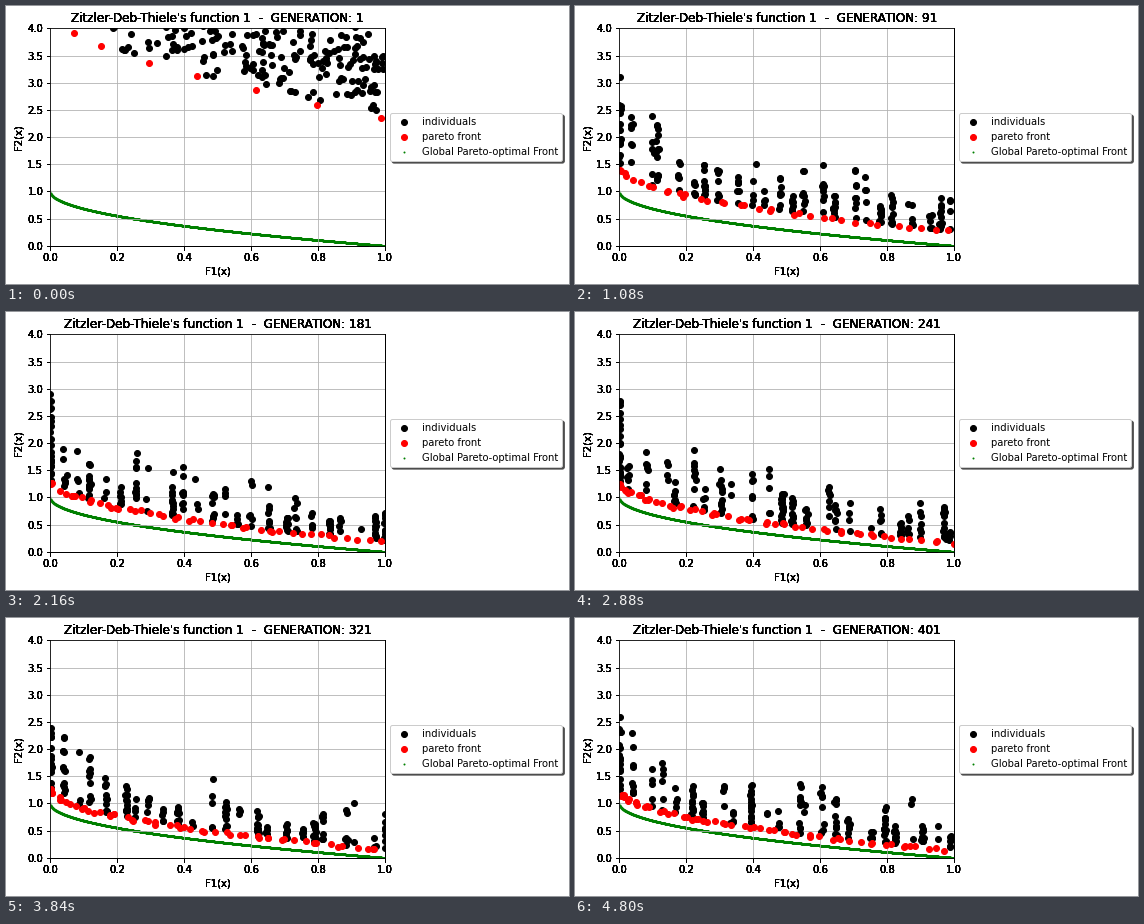
A matplotlib script that plays this animation: 563 by 278 pixels, repeating every 4.92 s.

```python
import matplotlib.pyplot as plt
import numpy as np
from matplotlib.animation import FuncAnimation

W, H, DPI = 563, 278, 72
FRAMES, INTERVAL, STEP = 41, 120, 10
NICHES, LIFE = 24, 9
TITLE = "Zitzler-Deb-Thiele's function 1  -  GENERATION: {}"
BOX = [44.3 / W, 38.19 / H, 334.8 / W, 217.44 / H]

plt.rcParams.update({"font.family": "DejaVu Sans", "font.size": 10})


def zdt1(x, g):
    return g * (1 - np.sqrt(x / g))


def best_g(gen):
    """Distance factor of the front: a fast drop, then a slow approach."""
    return 1.22 + .5 * np.exp(-gen / 110) + 2.75 * np.exp(-(gen - 1) / 15)


def niche(k, frame):
    """Place, height and weight of a niche; each is renewed every LIFE frames."""
    epoch = (frame + 5 * k) // LIFE
    rng = np.random.default_rng([k, epoch])
    x = min((k + rng.uniform(-.4, .4)) / (NICHES - 1), 1) if k else 0
    return x, rng.uniform(.4, 1.45) if k else 1.5, rng.uniform(.4, 1.6) if k else 2.5


def population(frame):
    """Return the individuals and the pareto front of one generation."""
    gen = 1 + frame * STEP
    rng = np.random.default_rng(500 + frame)
    g = best_g(gen)
    settled = 1 - np.exp(-(gen - 1) / 20)

    n = int(300 - 105 * settled)
    place, reach, weight = np.array([niche(k, frame) for k in range(NICHES)]).T
    pick = rng.choice(NICHES, n, p=weight / weight.sum())
    in_niche = rng.uniform(size=n) < settled
    x = np.where(in_niche, place[pick] + rng.normal(0, .002, n), rng.uniform(0, 1, n))
    x = np.clip(np.abs(x), 0, 1)

    spread = reach[pick] * (1 + .4 * np.exp(-gen / 80))
    late = .06 + spread * rng.uniform(0, 1, n) ** 1.3
    early = np.maximum(rng.normal(1.02, .47, n), .15)
    y = zdt1(x, g + settled * late + (1 - settled) * early)

    m = int(8 + 50 * (1 - np.exp(-gen / 110)))
    fx = np.linspace(0, .985, m) ** 1.4 + rng.normal(0, .012, m)
    fx = np.clip(np.abs(fx), 0, 1)
    fy = zdt1(fx, g + rng.uniform(-.02, .06, m))
    return (x, y), (fx, fy)


fig = plt.figure(figsize=(W / DPI, H / DPI), dpi=DPI, facecolor="white")


def make_axes(label):
    ax = fig.add_axes(BOX, label=label)
    ax.set(xlim=(0, 1), ylim=(0, 4), xlabel="F1(x)", ylabel="F2(x)")
    return ax


# Stacked axes give the labels and title their heavy edges
layers = [make_axes(str(k)) for k in range(8)]
ax = layers[-1]
dots, = ax.plot([], [], "ko", label="individuals")
front, = ax.plot([], [], "ro", label="pareto front")
curve = np.linspace(0, 1, 2000)
ax.scatter(curve, zdt1(curve, 1), s=1, color="green",
           label="Global Pareto-optimal Front")
ax.grid(True)
ax.legend(loc="center left", bbox_to_anchor=(1, .5), fancybox=True,
          framealpha=1, shadow={"alpha": 1})


def update(frame):
    for layer in layers:
        layer.set_title(TITLE.format(1 + frame * STEP))
    black, red = population(frame)
    dots.set_data(*black)
    front.set_data(*red)
    return []


anim = FuncAnimation(fig, update, frames=FRAMES, interval=INTERVAL,
                     init_func=lambda: [], repeat=True, repeat_delay=0, blit=False)
plt.show()
```
